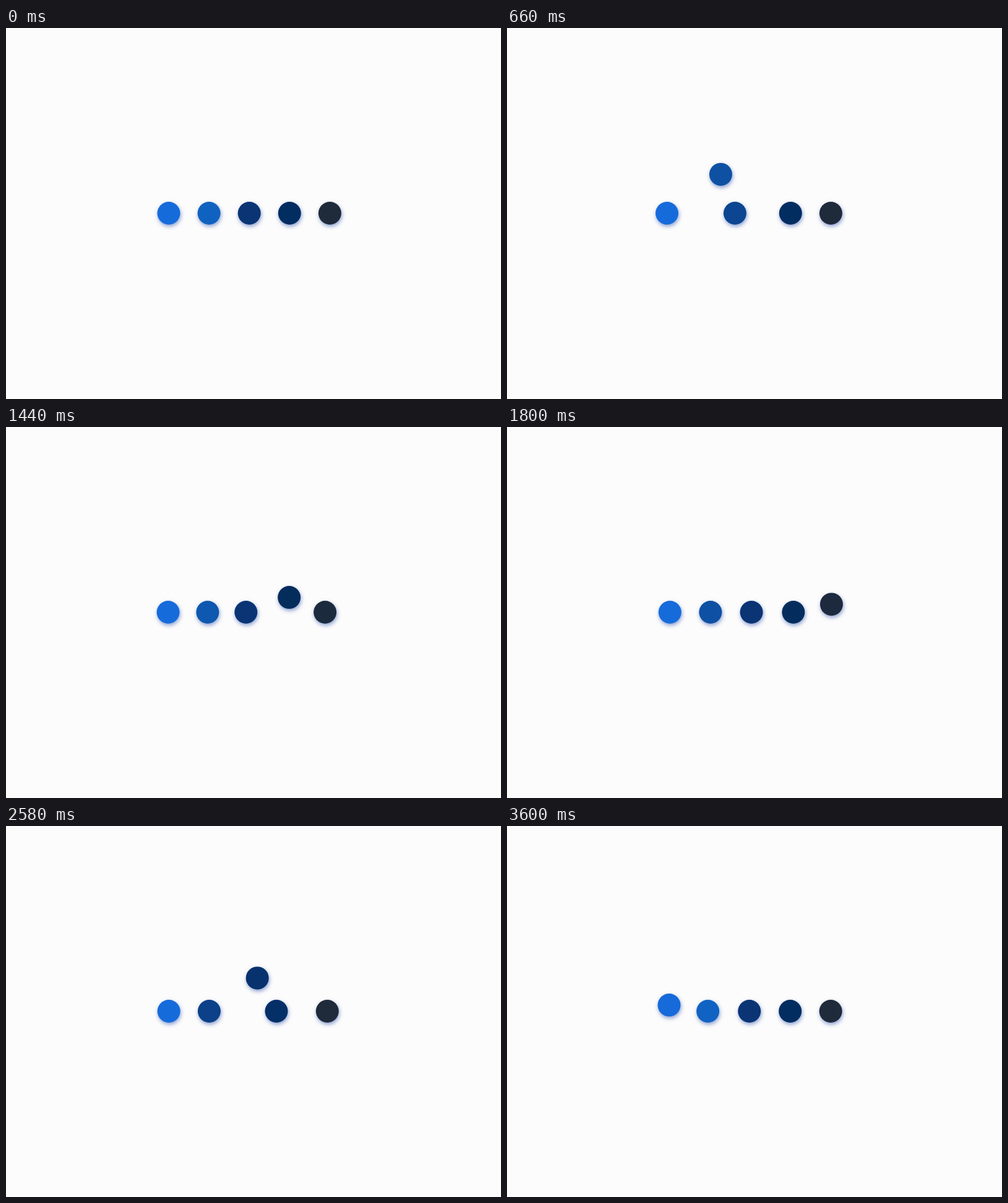
Recreate the animation shown at these times as an HTML page. Size 800 px wide and 600 px high, loop 3630 ms.

```html
<!DOCTYPE html>
<html lang="en">
<head>
<meta charset="utf-8">
<title>Swapping dots</title>
<style>
  html, body { margin: 0; width: 100%; height: 100%; overflow: hidden; background: #fcfcfc; }
  .dot {
    position: absolute; left: -18.5px; top: -18.5px;
    width: 37px; height: 37px; border-radius: 50%;
    box-shadow: 1px 3px 6px rgba(25, 65, 165, .5);
  }
</style>
</head>
<body>
<script>
const LOOP = 3630, TICK = 30, START = 43, SWAP = 448;
const X0 = 262.5, Y0 = 299, GAP = 65.1, HEIGHT = 66.5;
const COLORS = [[22, 107, 219], [16, 98, 192], [10, 52, 116], [2, 45, 96], [31, 42, 58]];

const clamp = v => Math.min(1, Math.max(0, v));
const swapStart = k => START + k * SWAP;
const mix = (a, b, p) => `rgb(${a.map((v, i) => Math.round(v + (b[i] - v) * p))})`;

const dots = COLORS.map(() => {
  const el = document.createElement('div');
  el.className = 'dot';
  return document.body.appendChild(el);
});

function place(dot, x, y, color) {
  dot.style.transform = `translate(${x.toFixed(2)}px, ${y.toFixed(2)}px)`;
  dot.style.backgroundColor = color;
}

// Share of one gap covered by a sliding dot: a steady slide, then a damped wobble.
function slide(t) {
  const turn = 416, left = 0.063;
  if (t <= 0) return 0;
  if (t < turn) return (1 - left) * t / turn;
  const d = t - 617;
  return 1 - 0.098 * Math.exp(-0.00194 * d) * Math.cos(2 * Math.PI * d / SWAP + 3.937);
}

// The hopping dot alternates below and above the row.
function drawHopper(t) {
  const s = Math.min(7.9999, Math.max(0, (t - START) / SWAP));
  const k = Math.floor(s), u = s - k, back = k > 3;
  const from = back ? 8 - k : k, dir = back ? -1 : 1;
  const w = Math.PI * u;
  const p = (1 - Math.cos(w)) / 2 - 0.065 * Math.sin(2 * w);
  const lift = (Math.sin(w) + 0.05 * Math.sin(2 * w) - 0.03 * Math.sin(3 * w)) / 1.03;
  place(dots[0], X0 + GAP * (from + dir * p), Y0 + HEIGHT * lift * (k % 2 ? -1 : 1),
    mix(COLORS[from], COLORS[from + dir], u));
}

function drawSlider(i, t) {
  const out = t - swapStart(i - 1), home = t - swapStart(8 - i);
  const fade = i === 2
    ? clamp((swapStart(7) - t) / (swapStart(7) - swapStart(2)))
    : 1 - clamp(home / SWAP);
  place(dots[i], X0 + GAP * (i - slide(out) * (1 - slide(home))), Y0,
    mix(COLORS[i], COLORS[i - 1], Math.min(clamp(out / SWAP), fade)));
}

function draw(time) {
  const t = Math.floor(time % LOOP / TICK) * TICK;
  drawHopper(t);
  for (let i = 1; i < dots.length; i++) drawSlider(i, t);
}

let begin;
function frame(now) {
  begin ??= now;
  draw(now - begin);
  requestAnimationFrame(frame);
}
draw(0);
requestAnimationFrame(frame);
</script>
</body>
</html>
```
